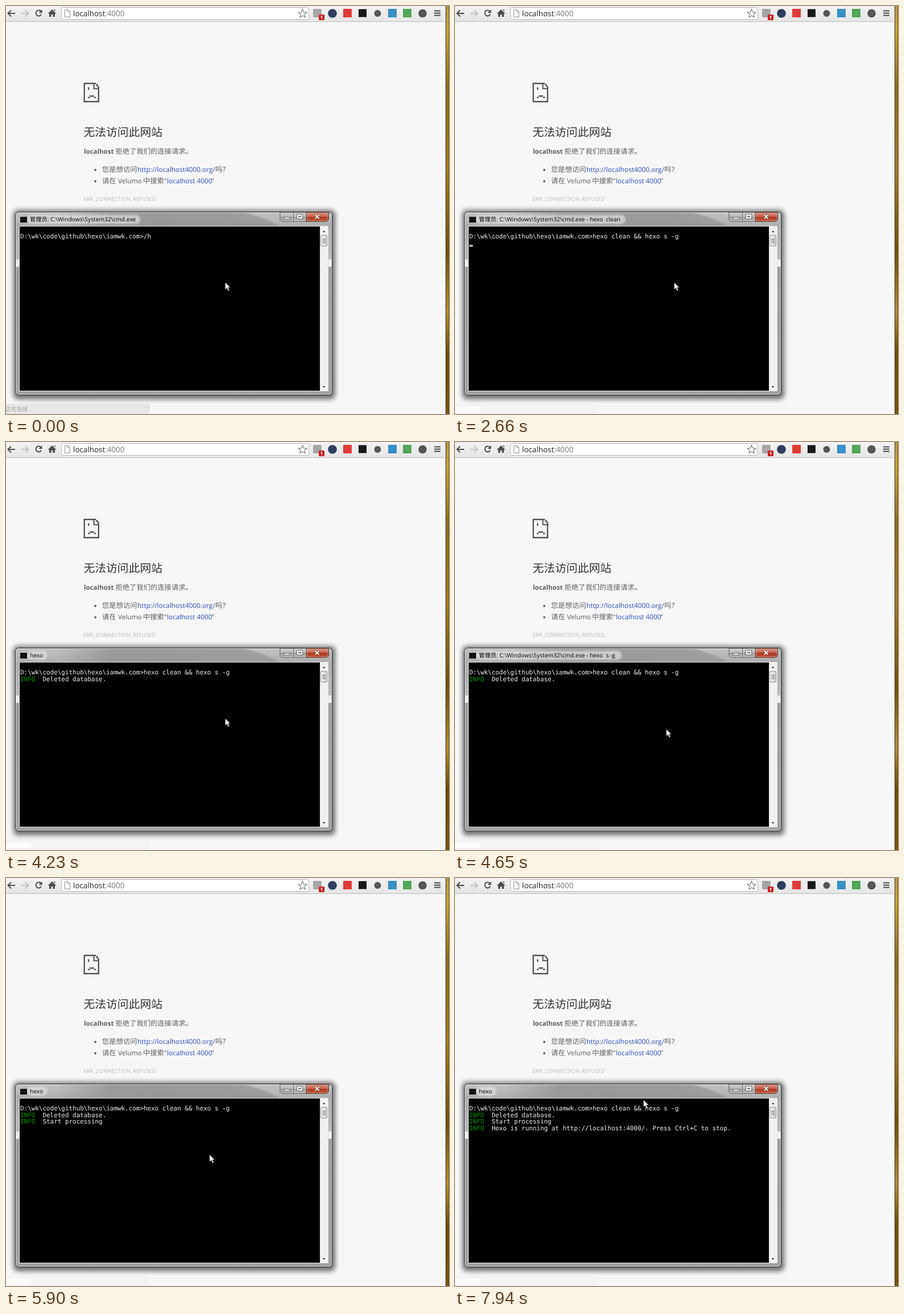
An HTML page for the animation above (8 s loop, 779x718 px).

```html
<!DOCTYPE html>
<html lang="zh-CN">
<head>
<meta charset="utf-8">
<title>Terminal demo</title>
<style>
html, body { margin: 0; width: 100%; height: 100%; overflow: hidden; background: #f7f7f7; }
svg { display: block; }
text { font-family: 'Open Sans', 'Noto Sans CJK SC', 'Noto Sans CJK', sans-serif; text-rendering: geometricPrecision; white-space: pre; text-spacing-trim: space-all; }
.cjk text { font-size: 12.3px; fill: #5e5e5e; }
.cjk .latin { font-size: 11.8px; }
.cjk .link { font-size: 11.8px; fill: #3050c4; }
#console text { font: 10.93px 'DejaVu Sans Mono', monospace; fill: #cfcfcf; stroke: #cfcfcf; stroke-width: .2px; }
#console .info { fill: #008000; stroke: #008000; }
</style>
</head>
<body>
<svg width="779" height="718" viewBox="0 0 779 718">
  <defs>
    <linearGradient id="bar" x2="0" y2="1"><stop stop-color="#f3f3f3"/><stop offset="1" stop-color="#e5e5e5"/></linearGradient>
    <linearGradient id="wall" x2="0" y2="1">
      <stop stop-color="#b8964a"/><stop offset=".06" stop-color="#c7a23c"/><stop offset=".2" stop-color="#8f6c22"/>
      <stop offset=".4" stop-color="#a27a25"/><stop offset=".6" stop-color="#71500e"/><stop offset=".75" stop-color="#b38b36"/>
      <stop offset=".85" stop-color="#6f4c08"/><stop offset="1" stop-color="#795512"/>
    </linearGradient>
    <linearGradient id="frame" x2="0" y2="1">
      <stop stop-color="#c2c2c2"/><stop offset=".08" stop-color="#adadad"/><stop offset=".26" stop-color="#b9b9b9"/>
      <stop offset=".261" stop-color="#eee"/><stop offset=".3" stop-color="#eee"/>
      <stop offset=".301" stop-color="#9c9c9c"/><stop offset="1" stop-color="#a2a2a2"/>
    </linearGradient>
    <linearGradient id="shade">
      <stop stop-color="#949494" stop-opacity="0"/><stop offset=".25" stop-color="#949494"/><stop offset="1" stop-color="#999"/>
    </linearGradient>
    <linearGradient id="button" x2="0" y2="1"><stop stop-color="#d2d2d2"/><stop offset=".48" stop-color="#b6b6b6"/><stop offset=".5" stop-color="#979797"/><stop offset="1" stop-color="#b8b8b8"/></linearGradient>
    <linearGradient id="close" x2="0" y2="1"><stop stop-color="#d99a8c"/><stop offset=".48" stop-color="#c26350"/><stop offset=".5" stop-color="#a93622"/><stop offset="1" stop-color="#c4573b"/></linearGradient>
    <linearGradient id="thumb"><stop stop-color="#f4f4f4"/><stop offset="1" stop-color="#cfcfcf"/></linearGradient>
    <filter id="soft" x="-10%" y="-10%" width="120%" height="120%"><feGaussianBlur stdDeviation="4"/></filter>
    <filter id="haze" x="-20%" y="-50%" width="140%" height="200%"><feGaussianBlur stdDeviation="1.5"/></filter>
  </defs>

  <rect width="779" height="718" fill="#f7f7f7"/>

  <!-- browser toolbar -->
  <rect width="773" height="27" fill="url(#bar)"/>
  <path d="M0 27.5H773" stroke="#bdbdbd"/>
  <rect x="97.5" y="2.5" width="435" height="21" rx="2" fill="#fff" stroke="#bababa"/>
  <g fill="none" stroke="#4d4d4d" stroke-width="2">
    <path d="M16 13H4M9 7.500L3.500 13L9 18.500"/>
    <path d="M27 13H39M34 7.500L39.500 13L34 18.500" stroke="#c3c3c3"/>
    <path d="M61.500 9.500A5 5 0 1 0 62 14.500"/>
    <path d="M63.500 6V12H57.500Z" fill="#4d4d4d" stroke="none"/>
    <path d="M81 6L88.500 13.500H86V19H82.500V15H79.500V19H76V13.500H73.500ZM84 6H86.500V10" fill="#4d4d4d" stroke="none"/>
    <path d="M103.500 6.500H109L112.500 10V19.500H103.500ZM109 6.500V10H112.500" stroke="#929292" stroke-width="1"/>
    <path id="star" stroke="#777" stroke-width="1.100"/>
    <path d="M753 8.500H764M753 12.500H764M753 16.500H764"/>
  </g>
  <text x="118" y="18" font-size="13.4" fill="#222">localhost<tspan fill="#777">:4000</tspan></text>
  <rect x="540" y="5" width="15" height="15" rx="2" fill="#a6a6a6"/>
  <rect x="550" y="15" width="10" height="10" rx="1.5" fill="#cf2020"/>
  <text x="555" y="23.200" font-size="8.500" font-weight="700" fill="#fff" text-anchor="middle">1</text>
  <circle cx="574" cy="13" r="7.800" fill="#2f3e5c"/>
  <rect x="593" y="5" width="15" height="15" fill="#e23b35"/>
  <rect x="620" y="5.500" width="14" height="14" fill="#171717"/>
  <circle cx="653.500" cy="13" r="6" fill="#555"/>
  <rect x="672" y="5" width="15" height="15" fill="#3a8fc4"/>
  <rect x="698" y="5" width="15" height="15" fill="#55a55a"/>
  <circle cx="732.500" cy="13" r="7.300" fill="#555"/>

  <!-- error page -->
  <g fill="none" stroke="#555" stroke-width="2.400">
    <path d="M158 136.200H137.700V168.300H162.800V142"/>
    <path d="M154.500 136V145.500H163M158 138.300H160.500V141H163"  stroke-width="2"/>
    <path d="M145.300 143V147.500"/>
    <path d="M144 161H147M147 158.500H155M155 161H158"/>
  </g>
  <text x="136.500" y="228.500" font-size="19.8" fill="#333">无法访问此网站</text>
  <g class="cjk">
    <text x="137" y="260" style="font-size:11.5px;font-weight:700">localhost</text>
    <text x="192.500" y="260">拒绝了我们的连接请求。</text>
    <circle cx="157" cy="288.500" r="2" fill="#646464"/>
    <circle cx="157" cy="308.500" r="2" fill="#646464"/>
    <text x="169" y="292">您是想访问</text>
    <text x="231" y="292" class="link">http://localhost4000.org/</text>
    <text x="368" y="292">吗？</text>
    <text x="169" y="312">请在</text>
    <text x="197" y="312" class="latin">Velumo</text>
    <text x="241" y="312">中搜索</text>
    <text x="278" y="312" class="latin">“</text>
    <text x="283" y="312" class="link">localhost 4000</text>
    <text x="361.500" y="312" class="latin">”</text>
  </g>
  <text x="136.500" y="343.300" font-size="9.48" fill="#b9bbb3">ERR_CONNECTION_REFUSED</text>

  <!-- status bubble -->
  <path id="bubble" d="M0 700H250Q253 700 253 703V718H0Z"/>
  <rect id="trace" y="705" width="44" height="9" fill="#fcfcfc"/>
  <text id="status" x="-1" y="713" font-size="9.8">正在连接...</text>

  <!-- desktop edge -->
  <rect x="772" width="1" height="718" fill="#dedede"/>
  <rect x="773" width="1" height="718" fill="#4c4637"/>
  <rect x="774" width="5" height="718" fill="url(#wall)"/>
  <rect x="778" width="1" height="718" fill="#3f2b05" opacity=".4"/>

  <!-- console window -->
  <rect x="13" y="359" width="566" height="333" rx="8" opacity=".55" filter="url(#soft)"/>
  <rect x="16.500" y="362.500" width="557" height="322" rx="6" fill="url(#frame)" stroke="#292929"/>
  <path d="M90 364H390Q440 371 481 387H90Z" fill="url(#shade)" opacity=".85"/>
  <path d="M390 364H420Q455 372 481 387Q435 371 390 364Z" fill="#a1a1a1"/>
  <rect x="17.500" y="363.500" width="555" height="320" rx="5" fill="none" stroke="#e4e4e4" opacity=".8"/>
  <rect id="glow" x="37" y="367.500" height="16" rx="8" fill="#e4e4e4" opacity=".65" filter="url(#haze)"/>
  <rect x="25" y="371" width="12" height="10" fill="#111"/>
  <text id="title" x="42" y="379" font-size="10.26"/>

  <path d="M482 363H567V375Q567 379 563 379H486Q482 379 482 375Z" fill="url(#button)" stroke="#555"/>
  <path d="M528 363H567V375Q567 379 563 379H528Z" fill="url(#close)" stroke="#59302a"/>
  <path d="M505.500 363V379" stroke="#666"/>
  <path d="M483.500 364V378H504V364M507 364V378H526.500V364M529.500 364V378H565.500V364" fill="none" stroke="#fff" opacity=".35"/>
  <g fill="#fff" stroke="#555" stroke-width=".8">
    <rect x="489" y="372" width="10" height="3"/>
    <path fill-rule="evenodd" d="M511.500 366.500H521.500V374.500H511.500ZM514.500 369.500V371.500H518.500V369.500Z"/>
  </g>
  <path d="M544 367.500L550.500 374M550.500 367.500L544 374" stroke="#6d2b20" stroke-width="3.400"/>
  <path d="M544 367.500L550.500 374M550.500 367.500L544 374" stroke="#fff" stroke-width="2"/>

  <rect x="23.500" y="387.500" width="543" height="290" stroke="#e8e8e8"/>
  <rect x="552" y="388" width="14" height="289" fill="#f0f0f0"/>
  <path d="M556.500 398L559 395L561.500 398ZM556.500 669L559 672L561.500 669Z" fill="#444"/>
  <rect x="553.500" y="403.500" width="11" height="19" rx="1.500" fill="url(#thumb)" stroke="#989898"/>
  <path d="M556 410.500H562M556 413.500H562M556 416.500H562" stroke="#666"/>

  <g id="console">
    <text id="command" x="25" y="409"/>
    <g id="output"></g>
    <rect id="caret" width="6.500" height="3" fill="#c8c8c8"/>
  </g>
  <path id="mouse" d="M.5 .5V13L3.400 10.300L5.600 15.200L7.700 14.200L5.500 9.500H9.300Z" fill="#fff" stroke="#333" stroke-width=".7"/>
</svg>
<script>
const LOOP = 8000, CELL = 6.58, ROW = 11.5;
const PROMPT = String.raw`D:\wk\code\github\hexo\iamwk.com>`;
const ADMIN = String.raw`管理员: C:\Windows\System32\cmd.exe`;
const $ = id => document.getElementById(id);

// Each entry holds a start time and the value valid from then on.
const commands = [[0, '/h'], [520, '/hc'], [1170, '/hcs'], [2660, 'hexo clean && hexo s -g']];
const titles = [
  [0, ADMIN, 229], [2660, ADMIN + ' - hexo  clean', 293], [3150, 'hexo', 66],
  [4380, ADMIN + ' - hexo  s -g', 286], [4830, 'hexo', 66]
];
const carets = [
  [0], [1080, 36, 0], [1170], [1570, 37, 0], [2100], [2660, 0, 1], [3150],
  [3670, 0, 1], [4230], [5220, 0, 2], [5810], [6830, 0, 3], [7320]
];
const logs = [
  [4230, 'Deleted database.'],
  [5900, 'Start processing'],
  [7660, 'Hexo is running at http://localhost:4000/. Press Ctrl+C to stop.']
];
const bubbles = [[0, '#e7e7e7', '#a2a2a2', 0], [90, '#efefef', '#cfcfcf', 0], [170, '#f4f4f4', 'none', 1]];

const current = (list, t) => list.findLast(item => item[0] <= t);
const set = (id, attrs) => Object.entries(attrs).forEach(([k, v]) => $(id).setAttribute(k, v));

const logRows = logs.map(([start, message], i) => {
  const row = document.createElementNS('http://www.w3.org/2000/svg', 'text');
  row.setAttribute('x', 25);
  row.setAttribute('y', 409 + ROW * (i + 1));
  row.innerHTML = `<tspan class="info">INFO</tspan>  ${message}`;
  $('output').append(row);
  return { row, start };
});

const starPoints = Array.from({ length: 10 }, (_, i) => {
  const a = i * Math.PI / 5 - Math.PI / 2, r = i % 2 ? 3.4 : 7.8;
  return `${521.5 + r * Math.cos(a)} ${13.5 + r * Math.sin(a)}`;
});
set('star', { d: `M${starPoints.join('L')}Z` });

function mouseAt(t) {
  if (t >= 7940) return [331, 390];
  if (t >= 7850) return [341, 424];
  if (t >= 5070) return [357.5, 486.5];
  // The hand dips down and swings back to the left in discrete steps.
  const p = Math.min(1, Math.max(0, Math.floor((t - 4230) / 75) / 10));
  return [385 - 28 * p * p * (3 - 2 * p), 486 + 18 * Math.sin(Math.PI * p) + 1.5 * p];
}

function render(t) {
  const [, bubble, statusColor, trace] = current(bubbles, t);
  set('bubble', { fill: bubble });
  set('status', { fill: statusColor });
  set('trace', { opacity: trace });

  const [, title, end] = current(titles, t);
  $('title').textContent = title;
  set('glow', { width: end + 7 - 37 });

  $('command').textContent = PROMPT + current(commands, t)[1];
  logRows.forEach(({ row, start }) => row.setAttribute('visibility', t >= start ? 'visible' : 'hidden'));

  const [, column, line] = current(carets, t);
  const shown = line !== undefined;
  set('caret', {
    visibility: shown ? 'visible' : 'hidden',
    x: 25 + (column || 0) * CELL,
    y: 409 + (line || 0) * ROW
  });
  set('mouse', { transform: `translate(${mouseAt(t)})` });
}

const started = performance.now();
function tick() {
  render((performance.now() - started) % LOOP);
  requestAnimationFrame(tick);
}
tick();
</script>
</body>
</html>
```
